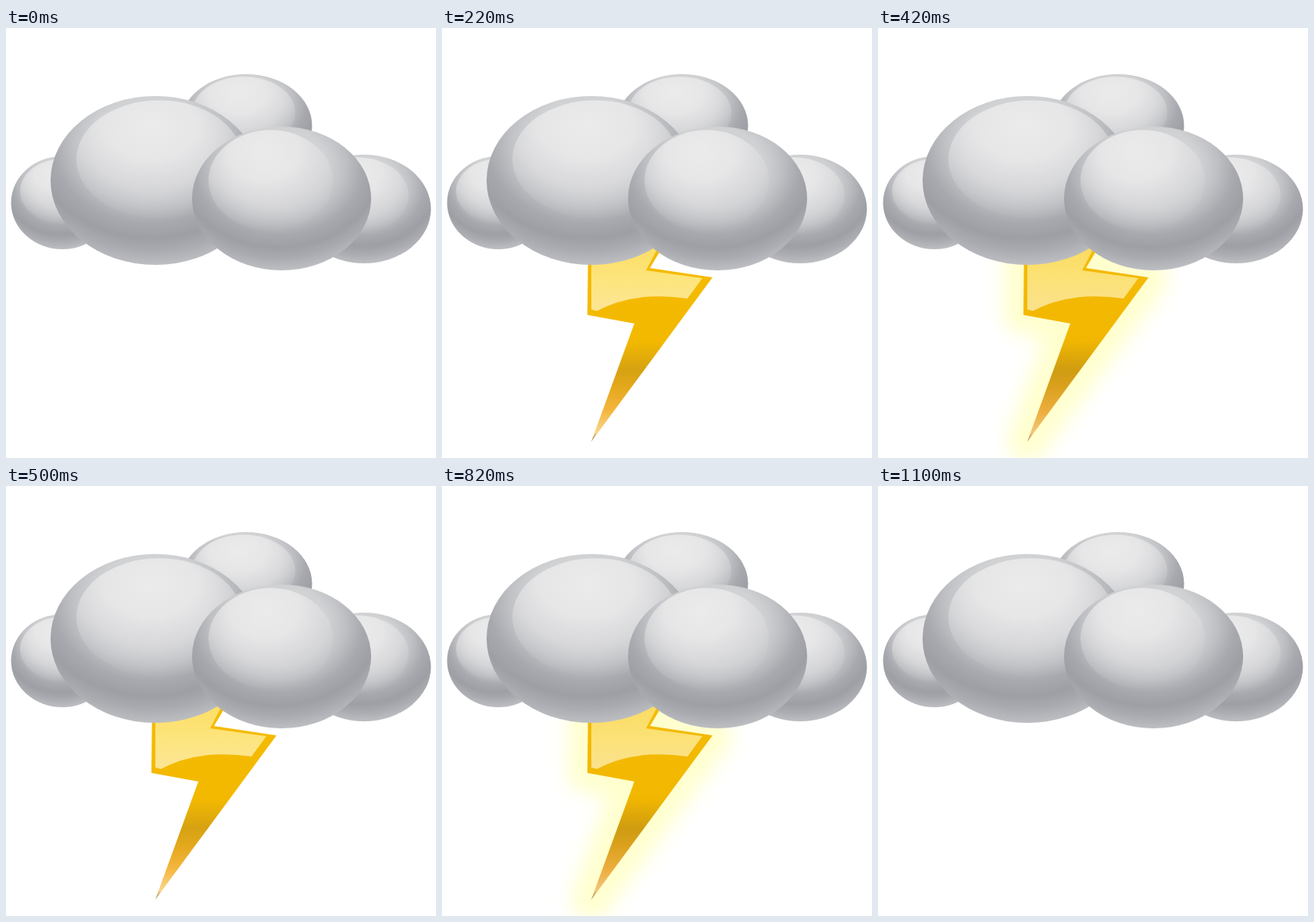
An HTML page that plays this animation: 550 px wide and 550 px high, repeating every 1.2 s.

```html
<!DOCTYPE html>
<html lang="en">
<head>
<meta charset="utf-8">
<title>Thunder cloud</title>
<style>
  html, body { margin: 0; width: 100%; height: 100%; overflow: hidden; background: #fff; }
  svg { display: block; width: 100%; height: 100%; }
</style>
</head>
<body>
<svg viewBox="0 0 550 550">
  <defs>
    <radialGradient id="body" cx=".48" cy=".28" r=".74">
      <stop offset="0" stop-color="#dadadc"/>
      <stop offset=".38" stop-color="#d0d1d3"/>
      <stop offset=".5" stop-color="#c0c1c5"/>
      <stop offset=".64" stop-color="#a7a9ae"/>
      <stop offset=".76" stop-color="#9d9fa5"/>
      <stop offset=".86" stop-color="#a9abb0"/>
      <stop offset="1" stop-color="#c2c3c7"/>
    </radialGradient>
    <radialGradient id="shine" cx=".45" cy=".22" r=".8">
      <stop offset="0" stop-color="#ebebec"/>
      <stop offset=".35" stop-color="#e8e8e9" stop-opacity=".92"/>
      <stop offset=".6" stop-color="#dedee0" stop-opacity=".65"/>
      <stop offset="1" stop-color="#c8c9cc" stop-opacity="0"/>
    </radialGradient>
    <linearGradient id="amber" gradientUnits="userSpaceOnUse" x1="0" y1="280" x2="0" y2="530">
      <stop offset="0" stop-color="#f5bb04"/>
      <stop offset=".48" stop-color="#f3b900"/>
      <stop offset=".63" stop-color="#d6a212"/>
      <stop offset=".72" stop-color="#e4a81c"/>
      <stop offset=".84" stop-color="#f5b640"/>
      <stop offset=".95" stop-color="#f8d68a"/>
      <stop offset="1" stop-color="#8c7c50"/>
    </linearGradient>
    <linearGradient id="gloss" gradientUnits="userSpaceOnUse" x1="0" y1="284" x2="0" y2="364">
      <stop offset="0" stop-color="#fcdf68"/>
      <stop offset=".5" stop-color="#fde57e"/>
      <stop offset="1" stop-color="#fbe596"/>
    </linearGradient>
    <linearGradient id="warm" gradientUnits="userSpaceOnUse" x1="0" y1="280" x2="0" y2="530">
      <stop offset="0" stop-color="#e8b020" stop-opacity=".06"/>
      <stop offset=".45" stop-color="#e0a000" stop-opacity=".06"/>
      <stop offset=".65" stop-color="#b88810" stop-opacity=".25"/>
      <stop offset="1" stop-color="#f0a860" stop-opacity=".35"/>
    </linearGradient>
    <filter id="blur" filterUnits="userSpaceOnUse" x="100" y="240" width="330" height="330">
      <feGaussianBlur stdDeviation="12"/>
    </filter>
    <path id="bolt" d="M187 270H288L266 307L346 319L191 529L246 378L186 367Z"/>
  </defs>
  <use class="lit" href="#bolt" fill="#ffff70" stroke="#ffff70" stroke-width="50"
       stroke-linejoin="round" opacity=".34" filter="url(#blur)"/>
  <g class="strike">
    <use href="#bolt" fill="url(#amber)"/>
    <path fill="url(#gloss)" d="M191 270H282L261 310L333 320L314 346Q246 336 198 362L191 360Z"/>
  </g>
  <use class="lit" href="#bolt" fill="url(#warm)"/>
  <g id="cloud"></g>
</svg>
<script>
  // cx, cy, rx, ry, shine cx, shine rx
  const puffs = [
    [307, 125, 84.5, 66, 304, 66],
    [72, 223.5, 65.5, 59.5, 74, 56],
    [458, 231.5, 85.5, 69.5, 450, 65],
    [191, 195, 134, 108, 196, 106],
    [352.5, 218, 114.5, 92, 338.5, 79.5]
  ];
  const oval = (cx, cy, rx, ry, fill) =>
    `<ellipse cx="${cx}" cy="${cy}" rx="${rx}" ry="${ry}" fill="url(#${fill})"/>`;

  document.getElementById('cloud').innerHTML = puffs.map(([x, y, rx, ry, sx, srx]) =>
    oval(x, y, rx, ry, 'body') + oval(sx, y - ry * 0.25, srx, ry * 0.7, 'shine')
  ).join('');

  const LOOP = 1200;
  // [start ms, visible]
  const steps = {
    strike: [[0, 0], [100, 1], [1100, 0]],
    lit: [[0, 0], [300, 1], [500, 0], [700, 1], [900, 0]]
  };
  for (const [name, table] of Object.entries(steps)) {
    const frames = [...table, [LOOP, 0]].map(([ms, on]) => ({
      offset: ms / LOOP,
      visibility: on ? 'visible' : 'hidden',
      easing: 'steps(1, end)'
    }));
    for (const el of document.querySelectorAll('.' + name)) {
      el.animate(frames, { duration: LOOP, iterations: Infinity }).startTime = 0;
    }
  }
</script>
</body>
</html>
```
